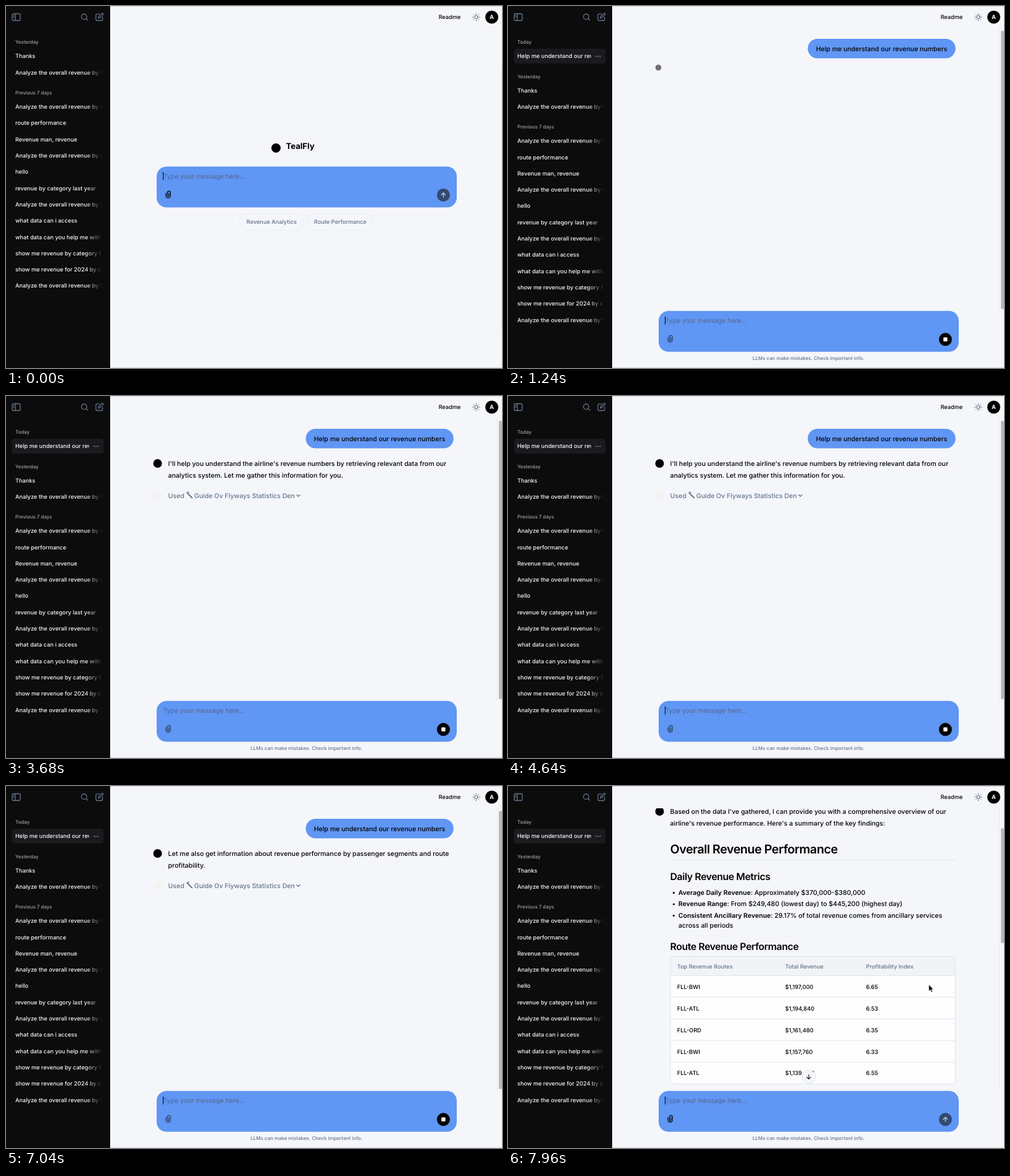
Recreate the animation shown at these times as an HTML page. Size 800 px wide and 585 px high, loop 8000 ms.

```html
<!DOCTYPE html>
<html lang="en">
<head>
<meta charset="utf-8">
<title>Chat assistant</title>
<style>
  html, body { margin: 0; width: 100%; height: 100%; overflow: hidden; background: #f4f6fa; }
  svg { display: block; width: 800px; height: 585px; }
  text { font: 450 10.5px Inter, sans-serif; font-optical-sizing: none; text-rendering: geometricPrecision; white-space: pre; }
  .small { font-size: 9.19px; font-weight: 500; }
  .tiny { font-size: 7.88px; font-weight: 500; }
  .muted { fill: #64748b; }
  .side { fill: #f8f8f9; }
  .label { fill: #a0a0a4; }
  .brand { font-size: 13.1px; font-weight: 700; }
  .h2 { font-size: 19.69px; font-weight: 600; letter-spacing: -.025em; }
  .h3 { font-size: 15.75px; font-weight: 600; letter-spacing: -.025em; }
  .hint { font-weight: 400; fill: #52668f; }
  .bold { font-weight: 600; }
  .mid { text-anchor: middle; }
  .icon { fill: none; stroke: #64748b; stroke-width: 1.3; stroke-linecap: round; stroke-linejoin: round; }
</style>
</head>
<body>
<svg viewBox="0 0 800 585">
  <defs>
    <linearGradient id="fade">
      <stop stop-color="#0c0c0d" stop-opacity="0"/>
      <stop offset="1" stop-color="#0c0c0d"/>
    </linearGradient>
    <clipPath id="view"><rect x="168" y="36" width="625" height="456"/></clipPath>
    <clipPath id="entry"><rect x="10" y="68" width="124" height="26"/></clipPath>
  </defs>
  <rect width="800" height="585" fill="#f4f6fa"/>

  <g id="hero">
    <circle cx="435.5" cy="229.5" r="7.5"/>
    <text class="brand" x="451.5" y="231">TealFly</text>
    <g fill="none" stroke="#e9edf3">
      <rect x="376.5" y="335.5" width="103.5" height="27" rx="13.5"/>
      <rect x="486" y="335.5" width="106.5" height="27" rx="13.5"/>
    </g>
    <text class="small muted mid" x="428.4" y="352.4">Revenue Analytics</text>
    <text class="small muted mid" x="539.2" y="352.4">Route Performance</text>
    <path d="M799.5 100V525" stroke="#e3e4e8"/>
  </g>

  <g id="chat">
    <g clip-path="url(#view)">
      <g id="scroll">
        <g id="bubble">
          <rect x="483.5" y="53" width="238.3" height="31.5" rx="15.75" fill="#6096f4"/>
          <text class="mid" x="602.6" y="72.5">Help me understand our revenue numbers</text>
        </g>
        <circle id="dot" cx="242.5" cy="99.5" r="4.8"/>
        <circle id="badge" cx="244.5" cy="109" r="7"/>
        <text id="line0" x="261.6" y="113.2"></text>
        <text id="line1" x="261.6" y="131.6"></text>
        <g id="tool">
          <circle id="status" cx="244.5" cy="161" r="6.5"/>
          <text class="muted" x="261.6" y="164.6" style="font-weight:500">Used</text>
          <path d="M294 158.5l6 6" stroke="#6b7280" stroke-width="2" stroke-linecap="round"/>
          <path d="M291.4 156.2l1.7 1.6 1.7-1.7-1.4-1.4" class="icon" stroke-width="1.6"/>
          <text class="muted" x="303.6" y="164.6" style="font-weight:500">Guide Ov Flyways Statistics Den</text>
          <path class="icon" d="M469 159.7l2.5 2.5 2.5-2.5" stroke-width="1.1"/>
        </g>
        <g id="report">
          <text class="h2" x="261.6" y="177.2">Overall Revenue Performance</text>
          <path d="M262 187.5H722" stroke="#e1e5ec"/>
          <text class="h3" x="261.6" y="219.6">Daily Revenue Metrics</text>
          <text x="274.8" y="244"><tspan class="bold">Average Daily Revenue</tspan>: Approximately $370,000-$380,000</text>
          <text x="274.8" y="262.4"><tspan class="bold">Revenue Range</tspan>: From $249,480 (lowest day) to $445,200 (highest day)</text>
          <text x="274.8" y="281"><tspan class="bold">Consistent Ancillary Revenue</tspan>: 29.17% of total revenue comes from ancillary services</text>
          <text x="274.8" y="296.8">across all periods</text>
          <circle cx="267.3" cy="240.6" r="1.6"/><circle cx="267.3" cy="259" r="1.6"/><circle cx="267.3" cy="277.5" r="1.6"/>
          <text class="h3" x="261.6" y="332.6">Route Revenue Performance</text>
          <rect x="262" y="343.5" width="459.5" height="206" rx="5.5" fill="#fdfdfe"/>
          <path d="M262 374.5V349a5.5 5.5 0 0 1 5.5-5.5H716a5.5 5.5 0 0 1 5.5 5.5V374.5z" fill="#f2f3f7"/>
          <rect x="262" y="343.5" width="459.5" height="206" rx="5.5" fill="none" stroke="#dfe3ea"/>
          <g id="table"></g>
        </g>
      </g>
    </g>
    <path d="M792.5 36V492" stroke="#e9eaee"/>
    <rect id="thumb" x="795" y="40" width="5" height="450" rx="2.5" fill="#b6b7ba"/>
    <g id="jump">
      <circle cx="485" cy="470" r="11" fill="#f4f6fa" stroke="#e4e8ee"/>
      <path class="icon" d="M485 466.5v7m-3.2-3.2l3.2 3.2 3.2-3.2" style="stroke:#111;stroke-width:1.1"/>
    </g>
    <text class="tiny muted mid" x="484.6" y="571.8">LLMs can make mistakes. Check important info.</text>
  </g>

  <g id="composer">
    <rect x="243" y="259.5" width="484" height="66" rx="15.75" fill="#6096f4"/>
    <text class="hint" id="hint" x="253.5" y="278.9">Type your message here...</text>
    <text id="typed" x="253.5" y="278.9"></text>
    <rect id="caret" x="253" y="268.3" width="1" height="13"/>
    <path id="clip" class="icon" d="M258 302.5v4a3.6 3.6 0 0 0 7.2 0v-5a2.4 2.4 0 0 0-4.8 0v5a1.2 1.2 0 0 0 2.4 0v-4" />
    <circle id="button" cx="705.5" cy="305.5" r="10.5"/>
    <path id="arrow" class="icon" d="M705.5 309v-7m-3.2 3.2l3.2-3.2 3.2 3.2"/>
    <rect id="stop" x="702.3" y="302.3" width="6.4" height="6.4" rx=".8" fill="#fff"/>
  </g>

  <path d="M168 .5H800M168 584.5H800" stroke="#d3d5d9"/>
  <text class="small" x="697.8" y="21.2">Readme</text>
  <g class="icon" style="stroke:#475569;stroke-width:1">
    <circle cx="758.5" cy="18" r="2.7"/>
    <path id="rays"/>
  </g>
  <circle cx="783.5" cy="18" r="10.5"/>
  <text class="small mid" x="783.5" y="21.3" fill="#fff" style="font-weight:700">A</text>

  <rect width="168" height="585" fill="#0c0c0d"/>
  <g class="icon">
    <rect x="10" y="12.5" width="13" height="11" rx="2"/>
    <path d="M15 12.5v11M12 15.5h1M12 18h1"/>
    <circle cx="126" cy="17.3" r="4.3"/><path d="M129.2 20.5l2.5 2.5"/>
    <path d="M150.5 12.8h-3.5a2 2 0 0 0-2 2v6.700a2 2 0 0 0 2 2h6.700a2 2 0 0 0 2-2v-3.500M149 19.500l.6-2.500 5-5a1.300 1.300 0 0 1 1.900 1.900l-5 5z"/>
  </g>
  <g id="today">
    <text class="tiny label" x="15" y="61.4">Today</text>
    <rect x="9.500" y="69" width="148" height="24" rx="4.500" fill="#1a1b1f"/>
    <text class="small side" x="15" y="84.400" clip-path="url(#entry)">Help me understand our revenue</text>
    <g fill="#a4a5aa"><circle cx="142" cy="81.300" r=".9"/><circle cx="145.300" cy="81.300" r=".9"/><circle cx="148.600" cy="81.300" r=".9"/></g>
  </g>
  <g id="history"></g>

  <path id="pointer" d="M678.700 321v10.600l2.400-2.200 1.700 3.900 1.900-.8-1.700-3.800h3.300z" stroke="#fff" stroke-width=".7"/>
</svg>
<script>
const LOOP = 8000, SENT = 832, BLINK = 1134;
const TODAY_AT = 1000, REPORT_AT = 7640;
const PROMPT = 'Help me understand our revenue numbers';
const replies = [
  { start: 1800, end: 2350, tool: 2450, lines: [
    "I'll help you understand the airline's revenue numbers by retrieving relevant data from our",
    'analytics system. Let me gather this information for you.'] },
  { start: 5100, end: 5550, tool: 5650, lines: [
    'Let me also get information about revenue performance by passenger segments and route',
    'profitability.'] },
  { start: REPORT_AT, end: REPORT_AT, tool: Infinity, lines: [
    "Based on the data I've gathered, I can provide you with a comprehensive overview of our",
    "airline's revenue performance. Here's a summary of the key findings:"] }
];

const el = {};
document.querySelectorAll('[id]').forEach(node => el[node.id] = node);
const show = (node, on) => node.style.display = on ? '' : 'none';
const clamp = v => Math.max(0, Math.min(1, v));
const progress = (t, from, to) => to > from ? clamp((t - from) / (to - from)) : +(t >= from);
const shift = (node, y) => node.setAttribute('transform', `translate(0 ${y})`);
const label = (cls, x, y, str) => `<text class="${cls}" x="${x}" y="${y}">${str}</text>`;

function buildHistory() {
  const overall = 'Analyze the overall revenue by ';
  const item = (str, y) => label('small side', 15, y, str);
  const recent = ['Thanks', overall + 'S'];
  const older = [overall + 'S', 'route performance', 'Revenue man, revenue', overall + 'c', 'hello',
    'revenue by category last year', overall + 'S', 'what data can i access',
    'what data can you help me with', 'show me revenue by category f',
    'show me revenue for 2024 by c', overall + 'S'];
  el.history.innerHTML = label('tiny label', 15, 61.4, 'Yesterday') +
    recent.map((s, i) => item(s, 84.4 + i * 26.3)).join('') +
    label('tiny label', 15, 143, 'Previous 7 days') +
    older.map((s, i) => item(s, 166.1 + i * 26.3)).join('') +
    '<rect x="128" y="70" width="28" height="400" fill="url(#fade)"/>' +
    '<rect x="156" y="70" width="12" height="400" fill="#0c0c0d"/>';
}

function buildTable() {
  const columns = [272.8, 447, 577.5];
  const row = (cells, y, cls) => cells.map((c, i) => label(cls, columns[i], y, c)).join('');
  const rows = ['FLL-BWI $1,197,000 6.65', 'FLL-ATL $1,194,840 6.53', 'FLL-ORD $1,161,480 6.35',
    'FLL-BWI $1,157,760 6.33', 'FLL-ATL $1,139,400 6.55'];
  el.table.innerHTML = row(['Top Revenue Routes', 'Total Revenue', 'Profitability Index'], 362.5, 'small muted') +
    rows.map((r, i) => `<path d="M262 ${374.5 + i * 34.9}H721.5" stroke="#dfe5ed"/>` +
      row(r.split(' '), 395.8 + i * 34.9, 'small')).join('');
}

function buildRays() {
  let d = '';
  for (let i = 0; i < 8; i++) {
    const c = Math.cos(i * Math.PI / 4), s = Math.sin(i * Math.PI / 4);
    d += `M${758.5 + 4.7 * c} ${18 + 4.7 * s}L${758.5 + 5.8 * c} ${18 + 5.8 * s}`;
  }
  el.rays.setAttribute('d', d);
}

function drawComposer(t, sent, done) {
  const typed = sent ? '' : PROMPT.slice(0, Math.round(PROMPT.length * progress(t, 60, 720)));
  const busy = sent && !done;
  shift(el.composer, sent ? 233.3 : 0);
  el.typed.textContent = typed;
  show(el.hint, !typed);
  el.caret.setAttribute('x', 253 + (typed ? el.typed.getComputedTextLength() : 0));
  show(el.caret, !sent || (t - SENT) % BLINK < BLINK / 2);
  el.clip.style.stroke = busy ? '#2b405f' : '#05070b';
  el.button.setAttribute('fill', busy || typed ? '#000' : '#34496f');
  el.arrow.style.stroke = typed ? '#fff' : '#bccbe6';
  show(el.arrow, !busy);
  show(el.stop, busy);
}

function drawReply(t) {
  const reply = replies.filter(r => t >= r.start).pop();
  show(el.dot, !reply);
  el.dot.style.opacity = .75 + .25 * Math.cos((t - SENT) / 1000 * 2 * Math.PI);
  show(el.badge, reply);
  show(el.tool, reply && t >= reply.tool);
  el.status.setAttribute('fill', Math.floor(t / 400) % 2 ? '#f3f4f0' : '#f0f2f5');
  const lines = reply ? reply.lines : ['', ''];
  const total = lines[0].length + lines[1].length;
  const count = reply ? Math.round(total * progress(t, reply.start, reply.end)) : 0;
  el.line0.textContent = lines[0].slice(0, count);
  el.line1.textContent = lines[1].slice(0, Math.max(0, count - lines[0].length));
}

function render(t) {
  const sent = t >= SENT, done = t >= REPORT_AT;
  show(el.hero, !sent);
  show(el.chat, sent);
  show(el.today, t >= TODAY_AT);
  shift(el.history, t >= TODAY_AT ? 55.2 : 0);
  drawComposer(t, sent, done);
  drawReply(t);

  const enter = 1 - (1 - progress(t, SENT, SENT + 260)) ** 2;
  el.bubble.style.opacity = enter;
  shift(el.bubble, 4 * (1 - enter));

  const p = progress(t, 7740, 7960);
  const scrolled = 68 * p * p * (3 - 2 * p);
  shift(el.scroll, -scrolled);
  el.thumb.setAttribute('y', 40 + scrolled * 28 / 68);
  el.thumb.setAttribute('height', done ? 186 : 450);
  for (const node of [el.report, el.jump, el.pointer]) show(node, done);
}

buildHistory();
buildTable();
buildRays();
const began = performance.now();
function tick() {
  render((performance.now() - began) % LOOP);
  requestAnimationFrame(tick);
}
tick();
</script>
</body>
</html>
```
